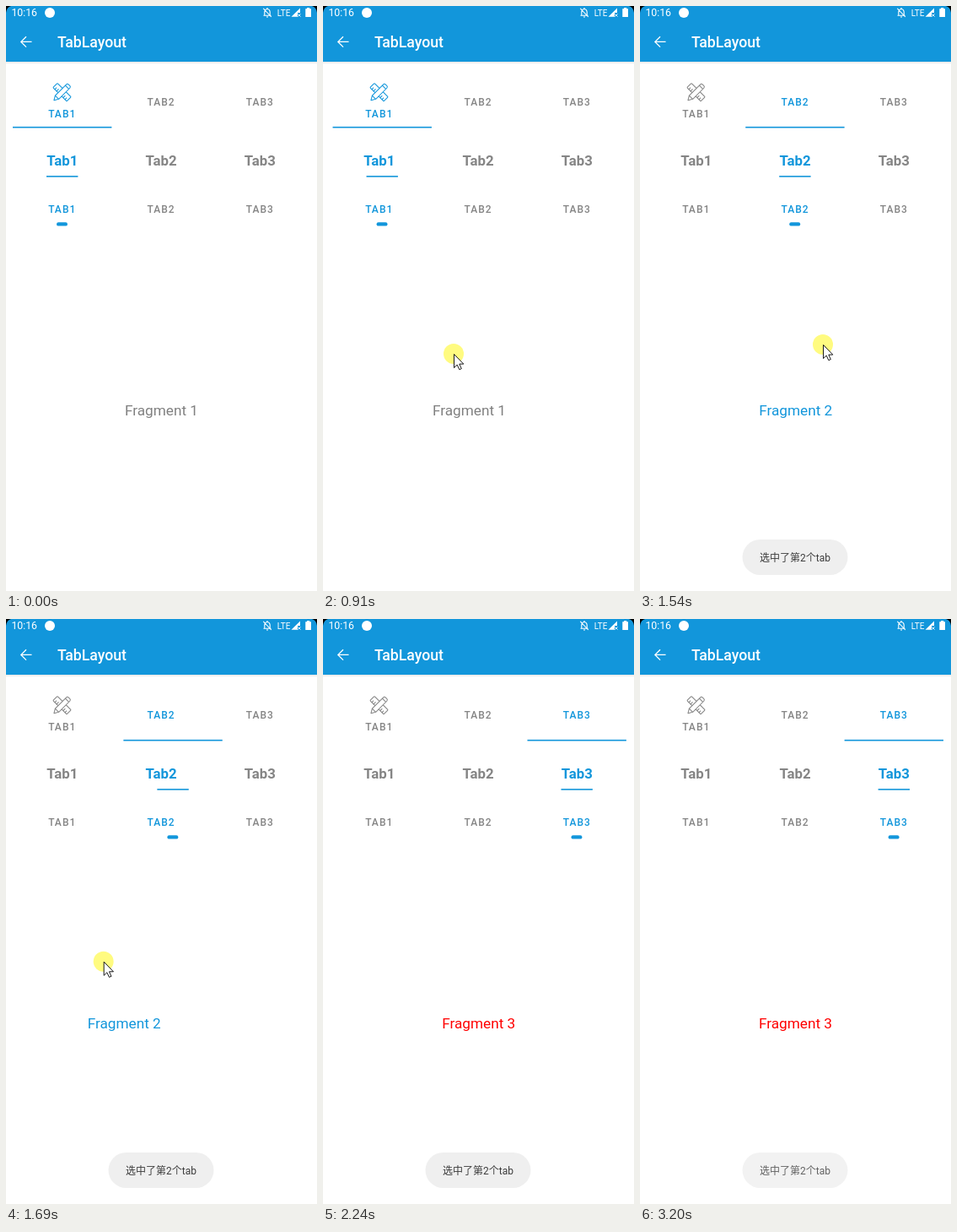
An HTML page for the animation above (3.28 s loop, 369 by 693 pixels).

```html
<!DOCTYPE html>
<html lang="en">
<head>
<meta charset="utf-8">
<title>TabLayout</title>
<style>
  html, body { margin: 0; width: 100%; height: 100%; overflow: hidden; background: #fff; }
  svg { display: block; width: 369px; height: 693px; font-family: Roboto, "Noto Sans CJK SC", "Noto Sans CJK", sans-serif; }
  .tab { fill: #858585; stroke: #858585; }
  .tab.on { fill: #1296db; stroke: #1296db; }
  .tab text { stroke: none; text-anchor: middle; }
  .caps { font-size: 12px; font-weight: 500; letter-spacing: 1.05px; }
  .big { font-size: 16.8px; font-weight: 700; }
  .icon { stroke-width: 1.05; stroke-linejoin: round; }
  #pages { font-size: 17.2px; text-anchor: middle; }
</style>
</head>
<body>
<svg viewBox="0 0 369 693">
  <defs>
    <linearGradient id="shade" x2="0" y2="1">
      <stop stop-opacity=".1"/><stop offset="1" stop-opacity="0"/>
    </linearGradient>
  </defs>
  <rect width="369" height="693" fill="#fff"/>
  <rect y="66" width="369" height="3" fill="url(#shade)"/>
  <rect width="369" height="66" fill="#1296db"/>
  <path d="M0 0H6Q1 1 0 8ZM369 0H363Q368 1 369 8Z"/>

  <g fill="#fff">
    <text x="6.4" y="12.4" font-size="12.3">10:16</text>
    <circle cx="52" cy="8" r="6"/>
    <text x="321.7" y="11.6" font-size="10">LTE</text>
    <path d="M349 2.5V8H346V12.8H338.5Z"/>
    <path d="M346.5 9.5l3 3m0-3l-3 3" stroke="#fff"/>
    <path d="M355.3 3.2H357.2V2H360.2V3.2H362V13H355.3Z"/>
    <g fill="none" stroke="#fff" stroke-width="1.1">
      <path d="M306.8 11.2V7Q307 3.8 310 3.5Q313 3.8 313.2 7V11.2M305.5 11.2H314.5M310 2V3.5M309 13H311M305.3 2.8L314.8 13"/>
      <path d="M30.5 42.4H18M24 36.2L17.8 42.4L24 48.6" stroke-width="1.3"/>
    </g>
    <text x="61" y="48.7" font-size="17.65" font-weight="500">TabLayout</text>
  </g>

  <g id="tabs"></g>
  <g id="marks" fill="#1296db">
    <rect x="8" y="142.9" width="117.4" height="1.6"/>
    <rect x="48" y="201.1" width="37.4" height="1.6"/>
    <rect x="60" y="256.2" width="13" height="4.4" rx="2.2"/>
  </g>
  <g id="pages"></g>

  <g id="toast">
    <rect x="121.5" y="632" width="125" height="42" rx="21" fill="#efefef"/>
    <text x="184" y="657.8" font-size="12" text-anchor="middle" fill="#3c3c3c">选中了第2个tab</text>
  </g>

  <g id="cursor">
    <circle id="press" r="12" fill="#fffb80"/>
    <path d="M.5.5V16.6L4.2 13.1L6.8 18.7L9.3 17.6L6.8 12.1H11.8Z" fill="#fff" stroke="#000" stroke-width=".9"/>
  </g>
</svg>
<script>
const LOOP = 3280, STEP = 78, FIRST_STEP = 204;
const PAGE = 369, TAB = 117.3;
const SWIPES = [906, 1608], DRAG_STEPS = 3;
const RELEASES = SWIPES.map(s => s + DRAG_STEPS * STEP);
const $ = id => document.getElementById(id);
const clamp = v => Math.min(1, Math.max(0, v));

// Pointer path: time, x, y
const path = [[204, 295, 663], [438, 245, 470], [610, 243, 468], [906, 155, 412], [1062, 64, 396],
  [1218, 211, 402], [1530, 217, 401], [1764, 65, 408], [1920, 94, 434], [2076, 165, 627]];

function pointer(t) {
  const i = path.findIndex(p => p[0] > t);
  if (i < 1) return path.at(i).slice(1);
  const [t0, x0, y0] = path[i - 1], [t1, x1, y1] = path[i];
  const u = (t - t0) / (t1 - t0);
  return [x0 + (x1 - x0) * u, y0 + (y1 - y0) * u];
}

// Accelerating drag, then an exponential settle after release
function swipe(t, start, gap, decay) {
  const n = Math.round((t - start) / STEP);
  if (n < 0) return 0;
  return n < DRAG_STEPS ? .03 * (n + 1) ** 2 : 1 - gap * decay ** (n - DRAG_STEPS);
}
const scroll = (t, gap, decay) => SWIPES.reduce((sum, start) => sum + swipe(t, start, gap, decay), 0);

const icon = `<g class="icon" fill="#fff" transform="translate(66.5 102.2)">
  <g transform="rotate(45)"><rect x="-11.5" y="-3.7" width="23" height="7.4" rx="1"/>
    <path d="M-8.5 3.7v-3M-5.5 3.7v-3.6M5.5 3.7v-3.6M8.5 3.7v-3"/></g>
  <g transform="rotate(-45)"><path d="M-13.5 0L-8.5-3H10Q12-3 12-1V1Q12 3 10 3H-8.5ZM-8.5-3V3M8.5-3V3"/></g>
</g>`;

$('tabs').innerHTML = [0, 1, 2].map(i => {
  const name = 'Tab' + (i + 1);
  const label = (y, style, text) => `<text x="${66.8 + TAB * i}" y="${y}" class="${style}">${text}</text>`;
  return `<g class="tab">${i ? '' : icon}
    ${label(i ? 118.3 : 132.2, 'caps', name.toUpperCase())}
    ${label(189, 'big', name)}
    ${label(244.8, 'caps', name.toUpperCase())}</g>`;
}).join('');
$('pages').innerHTML = ['#808080', '#1296db', '#f00'].map((color, i) =>
  `<text x="${184.5 + PAGE * i}" y="484.5" fill="${color}">Fragment ${i + 1}</text>`).join('');
const tabs = [...$('tabs').children];

function draw(now) {
  const time = now % LOOP;
  // The picture is refreshed in even steps
  const t = FIRST_STEP + STEP * Math.floor((time - FIRST_STEP) / STEP);
  const selected = RELEASES.filter(r => t >= r).length;
  const held = (t >= 438 && t < RELEASES[0]) || (t >= 1452 && t < RELEASES[1]);
  const fadeIn = clamp((t - RELEASES[0]) / 175), fadeOut = clamp((t - 2970) / 990);
  const set = (id, name, value) => $(id).setAttribute(name, value);

  tabs.forEach((tab, i) => tab.classList.toggle('on', i === selected));
  set('marks', 'transform', `translate(${scroll(t, .26, .32) * TAB})`);
  set('pages', 'transform', `translate(${-scroll(t, .21, .3) * PAGE})`);
  set('toast', 'opacity', fadeIn - fadeOut);
  set('cursor', 'transform', `translate(${pointer(t)})`);
  set('cursor', 'visibility', t >= FIRST_STEP && t < 2154 ? 'visible' : 'hidden');
  set('press', 'opacity', +held);
}

const start = performance.now();
function loop() {
  draw(performance.now() - start);
  requestAnimationFrame(loop);
}
loop();
</script>
</body>
</html>
```
